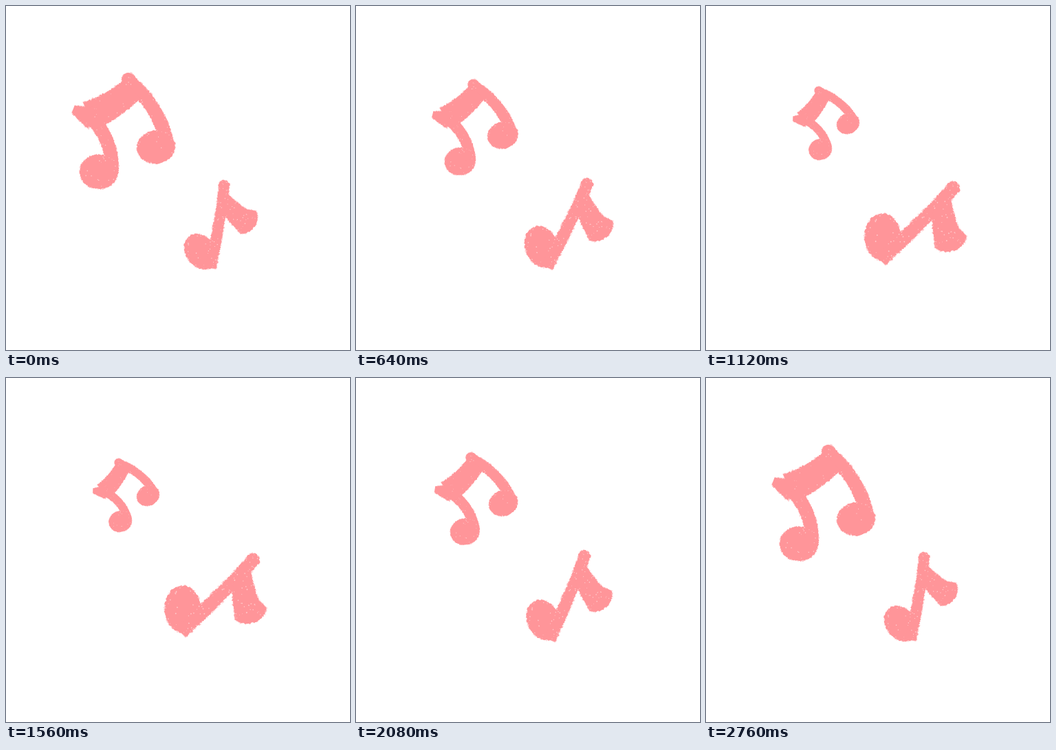
Animation, 500 px wide and 500 px high, one loop 2880 ms. Source, as an HTML page with a canvas:

```html
<!DOCTYPE html>
<html lang="en">
<head>
<meta charset="utf-8">
<title>Music notes</title>
<style>
  html, body { margin: 0; width: 100%; height: 100%; overflow: hidden; background: #fff; }
  canvas { display: block; width: 500px; height: 500px; }
</style>
</head>
<body>
<canvas id="stage" width="500" height="500"></canvas>
<script>
const ctx = document.getElementById('stage').getContext('2d');
const LOOP = 2880, STEP = 40, PINK = '#ff9599', PAPER = '#fff';
const radians = degrees => degrees * Math.PI / 180;

function seeded(seed) {
  return () => {
    seed = (seed * 1664525 + 1013904223) >>> 0;
    return seed / 4294967296;
  };
}
const random = seeded(7);
const jitter = amount => (random() - 0.5) * amount;

// Outline of a tilted ellipse, one sample about every pixel.
function blob(x, y, rx, ry, tilt = 0) {
  const count = Math.ceil(Math.PI * (rx + ry));
  const cos = Math.cos(radians(tilt)), sin = Math.sin(radians(tilt));
  return Array.from({ length: count }, (_, i) => {
    const a = i / count * 2 * Math.PI;
    const u = rx * Math.cos(a), v = ry * Math.sin(a);
    return [x + u * cos - v * sin, y + u * sin + v * cos];
  });
}

// Outline of a tapering band along a quadratic curve.
function band(start, bend, end, startWidth, endWidth) {
  const count = Math.ceil(Math.hypot(end[0] - start[0], end[1] - start[1]));
  const left = [], right = [];
  for (let i = 0; i <= count; i++) {
    const t = i / count, s = 1 - t;
    const [x, y] = [0, 1].map(k => s * s * start[k] + 2 * s * t * bend[k] + t * t * end[k]);
    const [dx, dy] = [0, 1].map(k => s * (bend[k] - start[k]) + t * (end[k] - bend[k]));
    const half = (startWidth * s + endWidth * t) / 2 / Math.hypot(dx, dy);
    left.push([x + dy * half, y - dx * half]);
    right.push([x - dy * half, y + dx * half]);
  }
  return left.concat(right.reverse());
}

function roughPath(outline, amount) {
  const path = new Path2D();
  for (const [x, y] of outline) path.lineTo(x + jitter(amount), y + jitter(amount));
  path.closePath();
  return path;
}

// Small bare spots, denser near the edge.
function specks(outline, density) {
  const path = new Path2D();
  const pick = () => outline[Math.floor(random() * outline.length)];
  for (let i = 0; i < outline.length * density; i++) {
    const [a, b, u, size] = [pick(), pick(), random() * 0.4, 0.6 + random() * 0.8];
    path.rect(a[0] + (b[0] - a[0]) * u, a[1] + (b[1] - a[1]) * u, size, size);
  }
  return path;
}

function makeNote(outlines, density, motion) {
  return {
    fringe: outlines.map(outline => roughPath(outline, 3.6)),
    body: outlines.map(outline => roughPath(outline, 2)),
    specks: outlines.map(outline => specks(outline, density)),
    ...motion
  };
}

const beamedNote = makeNote([
  blob(135, 241, 28, 25),                                        // left head
  blob(218, 205, 28, 24, -10),                                   // right head
  band([113, 155], [156, 186], [154, 241], 20, 19),              // left stem
  band([181, 111], [225, 150], [235, 204], 20, 20),              // right stem
  band([120, 160], [156, 146], [183, 121], 43, 36),              // beam
  band([98, 150], [112, 157], [126, 163], 12, 34),               // left corner
  blob(178, 106, 10, 9)                                          // top corner
], 0.1, {
  pivot: [165, 150.5],
  turn: { by: -19.6, out: [130, 1220], back: [1480, 2860] },
  scale: { by: -0.392, out: [200, 1080], back: [1590, 2640] }
});

const singleNote = makeNote([
  blob(283, 357, 28, 21.5, 53),                                  // head
  band([317.5, 262], [309, 325], [297, 381], 15, 17),            // stem
  band([316, 280], [330, 302], [350, 314], 20, 36),              // flag
  blob(351, 314, 19.5, 12, 125),                                 // flag end
  blob(317, 261, 8, 8)                                           // stem top
], 0.2, {
  pivot: [312.5, 320],
  turn: { by: 35.8, out: [175, 1130], back: [1440, 2610] },
  scale: { by: 0.222, out: [175, 1130], back: [1440, 2610] }
});

function ease(t, [from, to]) {
  const u = Math.min(1, Math.max(0, (t - from) / (to - from)));
  return u < 0.5 ? 4 * u ** 3 : 1 - 4 * (1 - u) ** 3;
}

const swing = (t, { by, out, back }) => by * (ease(t, out) - ease(t, back));

function fillAll(paths, color, alpha) {
  ctx.fillStyle = color;
  ctx.globalAlpha = alpha;
  for (const path of paths) ctx.fill(path);
}

function drawNote(note, t) {
  const [x, y] = note.pivot;
  const size = 1 + swing(t, note.scale);
  ctx.save();
  ctx.translate(x, y);
  ctx.rotate(radians(swing(t, note.turn)));
  ctx.scale(size, size);
  ctx.translate(-x, -y);
  fillAll(note.fringe, PINK, 0.45);
  fillAll(note.body, PINK, 1);
  fillAll(note.specks, PAPER, 0.5);
  ctx.restore();
}

function frame(now) {
  const t = Math.floor((now % LOOP) / STEP) * STEP;
  ctx.fillStyle = PAPER;
  ctx.fillRect(0, 0, 500, 500);
  drawNote(beamedNote, t);
  drawNote(singleNote, t);
  requestAnimationFrame(frame);
}
requestAnimationFrame(frame);
</script>
</body>
</html>
```
